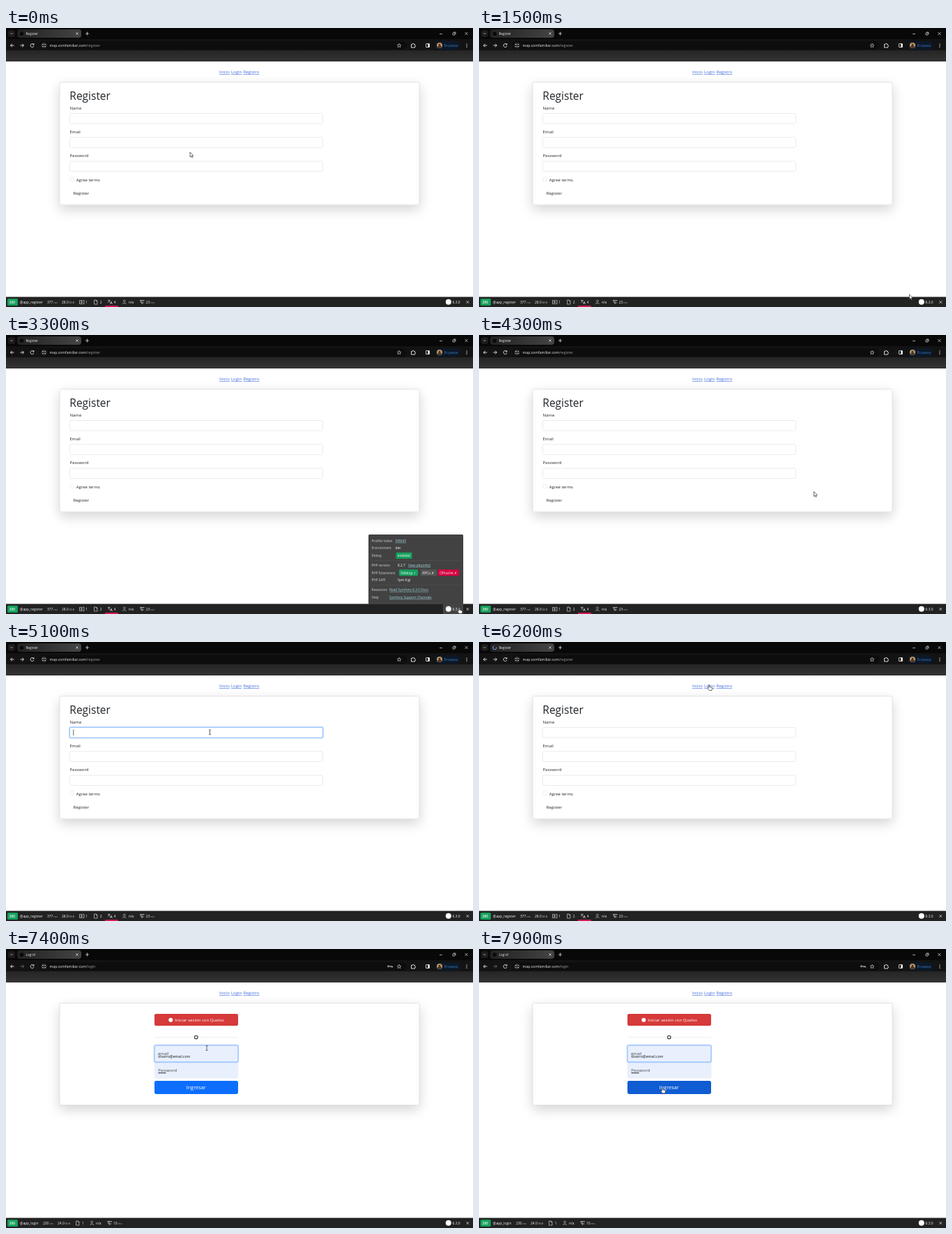
An HTML page that plays this animation: 670x400 px, repeating every 8000 ms.

```html
<!DOCTYPE html>
<html lang="es">
<head>
<meta charset="utf-8">
<title>Register</title>
<style>
html, body { margin: 0; width: 100%; height: 100%; overflow: hidden; background: #fff; }
#card { position: absolute; left: 77px; top: 78px; width: 516px; border-radius: 2px;
  background: #fff; box-shadow: 0 6px 18px rgba(0,0,0,.175); }
svg { position: absolute; left: 0; top: 0; font-family: "Open Sans", "Noto Sans", sans-serif; }
</style>
</head>
<body>
<div id="card"></div>
<svg id="stage" width="670" height="400" viewBox="0 0 670 400"></svg>
<script>
const LOOP = 8000, STEP = 100;
const GREEN = '#16a05d', BAR = '#222';

const text = (x, y, size, str, fill = '#212529', extra = '') =>
  `<text x="${x}" y="${y}" font-size="${size}" fill="${fill}" ${extra}>${str}</text>`;
const rect = (x, y, w, h, fill, r = 0, extra = '') =>
  `<rect x="${x}" y="${y}" width="${w}" height="${h}" rx="${r}" fill="${fill}" ${extra}/>`;
const line = (d, color = '#ddd', w = .8, extra = '') =>
  `<path d="${d}" fill="none" stroke="${color}" stroke-width="${w}" ${extra}/>`;
const dot = (x, y, r, fill) => `<circle cx="${x}" cy="${y}" r="${r}" fill="${fill}"/>`;
const group = (id, body) => `<g id="${id}">${body}</g>`;
const cross = (x, y, s, color, w) =>
  line(`M${x - s} ${y - s}l${2 * s} ${2 * s}M${x + s} ${y - s}l${-2 * s} ${2 * s}`, color, w);
const input = (x, y, w, h, fill = '#fff') => rect(x, y, w, h, fill, 2, 'stroke="#dee2e6" stroke-width=".7"');
const ring = (x, y, w, h, fill) =>
  rect(x - .6, y - .6, w + 1.2, h + 1.2, 'none', 2.5, 'stroke="#0d6efd" stroke-opacity=".25" stroke-width="1.8"') +
  rect(x, y, w, h, fill, 2, 'stroke="#86b7fe" stroke-width=".7"');
const link = (x, y, size, str, color) => text(x, y, size, str, color, 'text-decoration="underline"');

function browser() {
  return `<defs>
    <linearGradient id="tab"><stop stop-color="#222"/><stop offset="1" stop-color="#444"/></linearGradient>
    <linearGradient id="marks" x2="0" y2="1"><stop stop-color="#252525"/><stop offset="1" stop-color="#343434"/></linearGradient>
    </defs>` +
    rect(0, 0, 670, 17, '#080808') + rect(0, 16, 670, 17, '#131313') + rect(0, 32, 670, 16, 'url(#marks)') +
    rect(3, 3, 10, 10, '#1c1c1c', 3) + line('M6.5 7.3l1.5 1.5 1.5-1.5', '#ddd') +
    rect(16, 2, 92, 12, 'url(#tab)', 4) +
    cross(102, 8, 1.6, '#ddd', .8) + line('M114 8h5M116.500 5.500v5', '#ddd') +
    line('M622 8.500h4M641 7h3v3h-3zM642 6h3v3', '#ddd', .7) + cross(660.5, 8, 2, '#ddd', .7) +
    line('M11.500 25h-5m2.300-2.300L6.500 25l2.300 2.300', '#eee', .9) +
    `<g id="forward">${line('M20.500 25h5m-2.300-2.300 2.300 2.300-2.300 2.300', '#eee', .9)}</g>` +
    line('M39.700 23.600a2.500 2.500 0 1 0 .3 2.200M40 22.200v1.800h-1.800', '#eee', .9) +
    rect(48, 19, 527, 12, '#0d0d0d', 6) + dot(54.5, 25, 4.3, '#303030') +
    line('M52 23.500h2M55.500 23.500h1.500M52 26.500h1.500M55 26.500h2', '#ddd', .8) +
    `<text x="62.500" y="27" font-size="5.150" fill="#eee">map.comfamiliar.com<tspan id="route" fill="#999"></tspan></text>` +
    line('M564 22.200l.8 2 2.100.1-1.600 1.300.6 2.100-1.900-1.200-1.900 1.200.6-2.100-1.600-1.300 2.100-.1z', '#ddd', .6) +
    line('M581.500 23.300h1.700a1 1 0 0 1 2 0h1.300v1.500a1 1 0 0 1 0 2v1.200h-5z', '#eee', .9) +
    rect(602.5, 22.5, 5, 5, 'none', .5, 'stroke="#eee" stroke-width=".8"') + rect(605.3, 22.5, 2.2, 5, '#eee') +
    rect(615, 19, 37, 12, '#0c1827', 6) +
    dot(622, 25, 4, '#c79a63') + dot(622, 24, 1.6, '#4a3427') +
    `<path d="M619 27.600a3 2.500 0 0 1 6 0a4 4 0 0 1-6 0" fill="#4a3427"/>` +
    text(628.5, 26.7, 4.6, 'En pausa', '#3f7fd0') +
    [22.8, 25, 27.2].map(y => dot(661, y, .65, '#eee')).join('') +
    group('key', line('M549.500 25a1 1 0 1 0-.1.300M549.500 25h5v1.500M552.700 25v1.300', '#ddd', .9)) +
    group('favicon', dot(22.5, 8.3, 2.7, '#090909')) +
    group('spinner', line('M22.500 5.600a2.600 2.600 0 1 1-2.600 2.600', '#8ab4f8', .9)) +
    text(28.5, 9.8, 4.6, '', '#eee', 'id="title"');
}

function nav() {
  return [[306, 'Inicio'], [323, 'Login'], [340.5, 'Registro']]
    .map(([x, s]) => link(x, 65, 6, s, '#3a68d8')).join('');
}

function registerPage() {
  const fields = ['Name', 'Email', 'Password'].map((s, i) =>
    text(91.5, 116.5 + i * 34.4, 6, s) + input(91.5, 122.5 + i * 34.3, 363, 14.6)).join('');
  return text(91.3, 102.8, 15.5, 'Register', '#212529', 'font-weight="500"') + fields +
    group('nameRing', ring(91.5, 122.5, 363, 14.6, '#fff')) +
    group('nameCaret', line('M96.800 125.500v8.500', '#222', .7)) +
    rect(91.8, 214, 5.6, 5.6, '#fff', 1.5, 'stroke="#dee2e6" stroke-width=".6"') +
    text(100.8, 219.6, 6, 'Agree terms') + text(96.5, 238.5, 6, 'Register');
}

function loginPage() {
  return rect(213, 93, 120, 17, '#d63a3a', 2.2) + dot(236.3, 101.8, 3, '#fff') +
    text(242.3, 103.9, 6.1, 'Iniciar sesión con Quelvo', '#fff') +
    line('M213 126.500h55M278 126.500h55', '#e2e2e2', .6) +
    `<circle cx="272.800" cy="126.500" r="2.300" fill="none" stroke="#333" stroke-width="1.100"/>` +
    input(213.2, 138.3, 119.6, 23.5) + input(213.2, 161.8, 119.6, 23.2) +
    group('filled', rect(213.5, 162, 119, 22.7, '#e8f0fe', 2) +
      line('M218.500 177.600h11', '#222', 1.1, 'stroke-dasharray="1.100 .3"')) +
    group('emailRing', ring(213.2, 138.3, 119.6, 23.5, '#e8f0fe')) +
    text(218, 152.4, 6, 'email', '#444') + text(218.2, 175.6, 6, 'Password', '#444') +
    group('emailValue', text(218.2, 156.3, 5.1, 'tilvarro@email.com', '#111')) +
    group('emailCaret', line('M218.600 149.500v7.500', '#222', .6)) +
    rect(213, 189, 120, 19, '#0d6efd', 2.4, 'id="enter"') +
    text(258.5, 201.3, 7.4, 'Ingresar', '#fff', 'font-weight="500"');
}

const icons = {
  mail: 'M0-2.500h3v5h-3zM4-2.500h2.500v5h-2.500M1 0h4',
  page: 'M.5-3h3l1.500 1.500v4.500h-4.500zM3.300-3v1.700h1.700',
  words: 'M0-2.500h3.500M1.800-3.200v.7M.5.700l2.500-3M3.500 3l1.500-4 1.500 4M4 1.500h2M1-1.500l2 2',
  user: 'M2.800-3a1.400 1.400 0 1 1-.01 0M.3 3a2.600 2.600 0 0 1 5 0',
  fork: 'M0-2.500h6M1-2.500v1.500a2 2 0 0 0 2 2h3M3-2.500v5.500M5-1.500l1.500-1'
};

function debugBar(id, route, ms, mem, items) {
  const unit = (x, n, u) =>
    `<text x="${x}" y="394.800" font-size="4.900" fill="#f5f5f5">${n}<tspan dx=".800" fill="#aaa" font-size="4.300">${u}</tspan></text>`;
  const shift = route.length > 10 ? 6 : 0;
  return group(id, text(20, 394.8, 4.9, '@' + route, '#f5f5f5') +
    unit(53 + shift, ms, 'ms') + unit(74 + shift, mem, 'MiB') +
    items.map(([x, icon, n, u]) => `<g transform="translate(${x} 393)">${line(icons[icon], '#ccc', .7)}</g>` +
      unit(x + 8.7, n, u || '')).join(''));
}

function popup() {
  const label = (y, s) => text(524.5, y, 4.55, s, '#b0b0b0', 'font-weight="600"');
  const value = (x, y, s) => text(x, y, 4.8, s, '#f5f5f5');
  const badge = (x, y, w, s, fill) => rect(x, y - 6.2, w, 9, fill, 1.2) + value(x + 2.2, y, s);
  const anchor = (x, y, s) => link(x, y, 4.8, s, '#9ed3dc');
  return rect(520, 286, 136, 100, '#424242', 1.5) + rect(627, 386, 29, 14, '#444') +
    label(296.7, 'Profiler token') + anchor(558.5, 296.7, '5f9b95') +
    label(307.3, 'Environment') + value(558.5, 307.3, 'dev') +
    label(318.2, 'Debug') + badge(559.5, 318, 23, 'enabled', GREEN) +
    line('M524 323.500h128M524 358.500h128', '#555', .5) +
    label(331.7, 'PHP version') + value(562, 331.7, '8.2.7') + anchor(577, 331.7, 'View phpinfo()') +
    label(342.5, 'PHP Extensions') + badge(564, 342.5, 27, 'Xdebug ✓', GREEN) +
    badge(595, 342.5, 23, 'APCu ✗', '#555') + badge(620, 342.5, 30, 'OPcache ✗', '#d8003f') +
    label(353.2, 'PHP SAPI') + value(562, 353.2, 'fpm-fcgi') +
    label(366.9, 'Resources') + anchor(550, 366.9, 'Read Symfony 6.3.0 Docs') +
    label(377.7, 'Help') + anchor(550, 377.7, 'Symfony Support Channels');
}

function toolbar() {
  return rect(0, 385.5, 670, 14.5, BAR) + rect(2, 388, 15, 10, GREEN, 1.5) +
    text(4.7, 394.8, 4.8, '200', '#fff', 'font-weight="600"') +
    debugBar('barRegister', 'app_register', 377, '28.0', [[105.5, 'mail', 1], [126, 'page', 2],
      [146, 'words', 4], [167, 'user', 'n/a'], [192, 'fork', 23, 'ms']]
    ).replace('</g>', '</g>' + rect(142, 398, 19, 2, '#d01a50')) +
    debugBar('barLogin', 'app_login', 230, '24.0', [[100, 'page', 1], [120.3, 'user', 'n/a'], [145.3, 'fork', 10, 'ms']]) +
    group('popup', popup()) +
    dot(634.8, 392.8, 4, '#fff') + text(640.6, 394.8, 4.9, '6.3.0', '#f5f5f5') +
    cross(662.3, 393, 1.8, '#ccc', .9);
}

const pointers = {
  arrow: '<path d="M0 0v7l1.600-1.500 1.100 2.400 1.100-.5-1.100-2.300h2.200z" fill="#fff" stroke="#111" stroke-width=".6"/>',
  hand: '<path d="M.2.700q.8-1.200 1.500 0v2.600l3.300.8q.9.300.7 1.300l-.7 3h-3.700l-2.500-3q-.2-1 .7-.9l.7.700z" fill="#fff" stroke="#111" stroke-width=".6"/>',
  beam: line('M-1.500-3.300h1.200l.3.300.3-.3h1.200M0-3v6M-1.500 3.300h1.200l.3-.3.3.3h1.200', '#222', .7)
};

document.getElementById('stage').innerHTML = rect(77, 77.7, 516, 0, 'none', 2, 'id="edge" stroke="#d3d3d3" stroke-width=".6"') +
  nav() + group('register', registerPage()) + group('login', loginPage()) + browser() +
  group('toolbar', toolbar()) +
  group('pointer', Object.keys(pointers).map(k => group(k, pointers[k])).join(''));

const $ = id => document.getElementById(id);
const show = (id, on) => { $(id).style.display = on ? '' : 'none'; };

// time, x, y, pointer shape from that time on
const path = [
  [0, 264, 178, 'arrow'], [100, 264, 178, 'arrow'], [700, 381, 277, 'arrow'], [800, 381, 277, 'arrow'],
  [900, 232, 277, 'arrow'], [1000, 232, 277, 'arrow'], [1500, 617.5, 382, 'arrow'], [1800, 660, 391, 'hand'],
  [1900, 660, 391, 'hand'], [2000, 663, 391, 'hand'], [2200, 649, 391, 'hand'], [3300, 649, 391, 'hand'],
  [3600, 600, 350, 'arrow'], [4000, 561, 329, 'arrow'], [4100, 561, 329, 'arrow'], [4500, 400, 120, 'arrow'],
  [4700, 335, 70, 'arrow'], [4900, 292.5, 126, 'beam'], [5000, 292.5, 129.3, 'beam'], [5200, 292.5, 129.3, 'beam'],
  [5500, 310, 95, 'arrow'], [6000, 329, 61, 'hand'], [6700, 329, 61, 'hand'], [6900, 324, 75, 'arrow'],
  [7000, 324, 75, 'arrow'], [7300, 296, 122, 'arrow'], [7400, 288, 142, 'beam'], [7600, 270, 175, 'beam'],
  [7700, 264, 190, 'hand'], [7800, 262, 198.5, 'hand'], [8000, 262, 198.5, 'hand']
];

function movePointer(t) {
  const i = path.findIndex(p => p[0] > t);
  const [t0, x0, y0, kind] = path[i - 1], [t1, x1, y1] = path[i];
  const k = (t - t0) / (t1 - t0);
  $('pointer').setAttribute('transform', `translate(${x0 + (x1 - x0) * k} ${y0 + (y1 - y0) * k})`);
  for (const name in pointers) show(name, name === kind);
}

function draw(t) {
  const login = t >= 6800, loading = t >= 6200 && t < 6800, filled = t >= 7000;
  const height = login ? 146 : 175.5;
  $('card').style.height = height + 'px';
  $('edge').setAttribute('height', height);
  show('register', !login);
  show('login', login);
  $('title').textContent = login ? 'Log in!' : 'Register';
  $('route').textContent = login ? '/login' : '/register';
  $('forward').style.opacity = login ? .4 : 1;
  show('favicon', !loading);
  show('spinner', loading);
  $('spinner').setAttribute('transform', `rotate(${t * .36} 22.5 8.2)`);

  show('nameRing', t >= 5100 && t < 6200);
  show('nameCaret', t >= 5000 && t < 6200 && (t - 5000) % 1000 < 500);

  show('key', filled);
  show('filled', filled);
  show('emailValue', filled);
  show('emailRing', filled);
  show('emailCaret', t < 7400);
  $('enter').setAttribute('fill', t < 7700 ? '#0d6efd' : t < 7800 ? '#0c66ea' : '#0f5cd3');

  show('toolbar', !login || t >= 7100);
  show('barRegister', !login);
  show('barLogin', login);
  show('popup', t >= 2200 && t < 4300);
  movePointer(t);
}

function frame() {
  const t = performance.now() % LOOP;
  draw(Math.floor(t / STEP) * STEP);
  requestAnimationFrame(frame);
}
frame();
</script>
</body>
</html>
```
